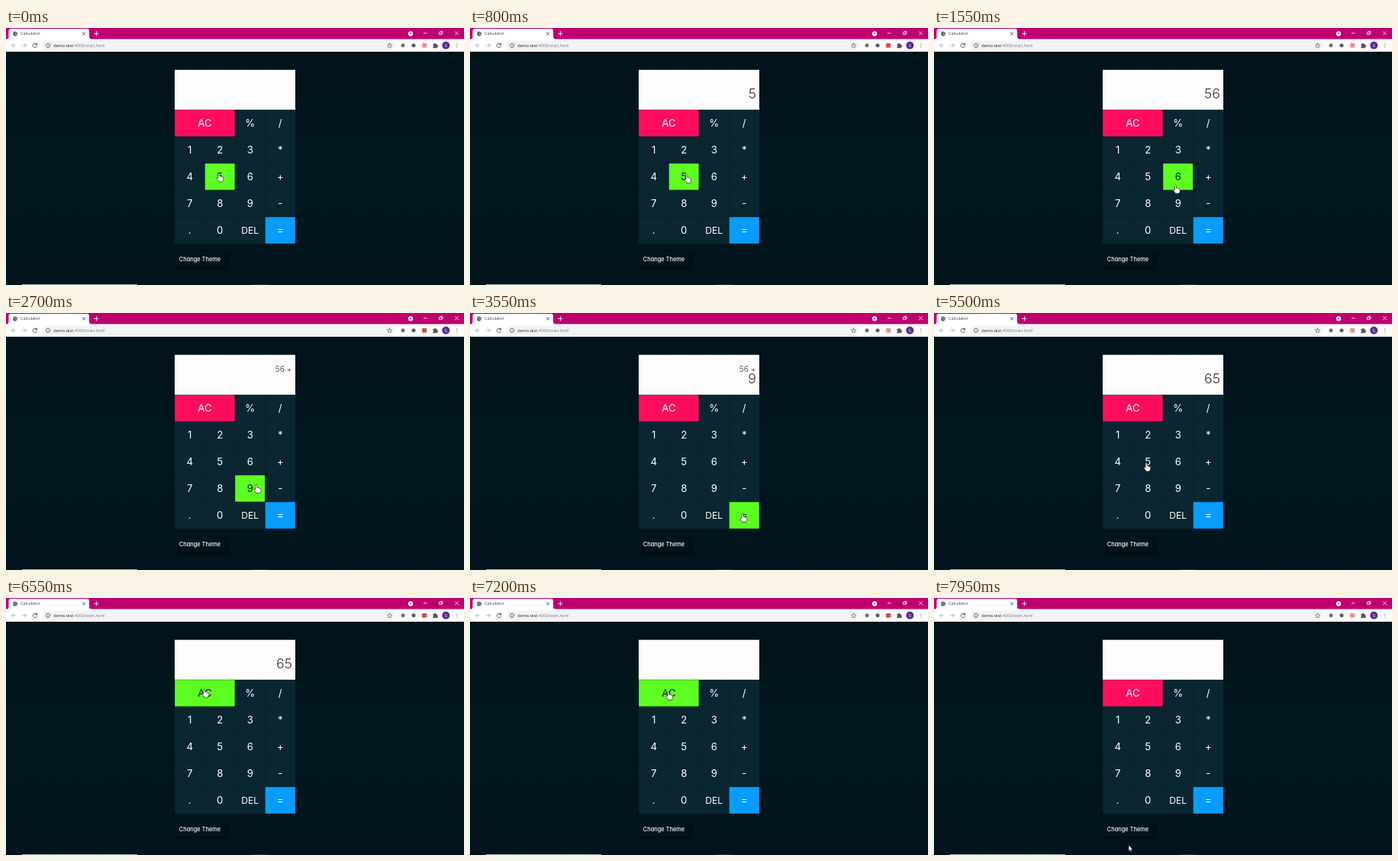
An HTML page that plays this animation: 600x336 px, repeating every 8 s.

```html
<!DOCTYPE html>
<html lang="en">
<head>
<meta charset="utf-8">
<title>Calculator</title>
<style>
html, body { margin: 0; width: 100%; height: 100%; overflow: hidden; background: #01161e; }
svg { display: block; width: 100vw; height: 100vh; }
text { font-family: Inter, sans-serif; font-feature-settings: "cv11"; }
.ui { font-family: "Open Sans", sans-serif; font-size: 5.5px; }
.line { fill: none; stroke-width: 1; stroke-linecap: round; stroke-linejoin: round; }
.theme { filter: drop-shadow(2px 2px 2.5px #000a); }
</style>
</head>
<body>
<svg id="stage" viewBox="0 0 600 336" preserveAspectRatio="none">
  <defs>
    <linearGradient id="page" x1="0" y1="0" x2="0" y2="1">
      <stop offset="0" stop-color="#01131b"/>
      <stop offset=".5" stop-color="#01171f"/>
      <stop offset="1" stop-color="#01141b"/>
    </linearGradient>
  </defs>
  <rect y="30" width="600" height="306" fill="url(#page)"/>

  <!-- title bar -->
  <rect width="600" height="15" fill="#bf006f"/>
  <path d="M0 15Q3.5 15 3.5 11V4Q3.5 1 6.5 1H106Q109 1 109 4V11Q109 15 113 15Z" fill="#fff"/>
  <circle cx="12" cy="7.5" r="2.9" fill="#50565b"/>
  <path class="line" d="M10 6.7q1.6 0 2 1.1t1.7 1M12.5 5.2l1.2.8" stroke="#fff" style="stroke-width:.7"/>
  <text class="ui" x="19" y="9.3" fill="#3c4043">Calculator</text>
  <path class="line" d="M100.3 5.7l3.4 3.4m0-3.4l-3.4 3.4" stroke="#44484b" style="stroke-width:.9"/>
  <path class="line" d="M116 7.3h5M118.5 4.8v5" stroke="#fff"/>
  <circle cx="530" cy="7.4" r="3.1" fill="#fff"/>
  <path d="M528.6 6.6h2.8L530 8.6Z" fill="#bf006f"/>
  <path class="line" d="M547.3 6.8h4M567.7 5.6h3v3h-3ZM569 5.4V4.3h3v3h-1M588.5 4.8l4 4m0-4l-4 4" stroke="#fff" style="stroke-width:.8"/>

  <!-- toolbar -->
  <rect y="14.5" width="600" height="16.5" fill="#fff"/>
  <g class="line">
    <path d="M12.5 22.8H7.5m2.3-2.4l-2.4 2.4 2.4 2.4M21.5 22.8h5m-2.3-2.4l2.4 2.4-2.4 2.4" stroke="#b3b6b9"/>
    <path d="M40 21.2A2.7 2.7 0 1 0 40.5 23.8M40.6 19.8v2.1h-2.1" stroke="#50555a"/>
  </g>
  <rect x="47" y="16.4" width="463" height="12.8" rx="6.4" fill="#f1f3f4"/>
  <circle class="line" cx="55" cy="22.8" r="2.8" stroke="#5f6368" style="stroke-width:.8"/>
  <path class="line" d="M55 22.6v1.7M55 21.2v.1" stroke="#5f6368" style="stroke-width:.8"/>
  <text class="ui" x="62.3" y="24.9" fill="#222528" textLength="">demo.test<tspan fill="#74787c">:4300/start.html</tspan></text>
  <path class="line" d="M502.5 19.9l.9 1.9 2.1.3-1.5 1.4.4 2.1-1.9-1-1.9 1 .4-2.1-1.5-1.4 2.1-.3Z" stroke="#55595d" style="stroke-width:.7"/>
  <circle cx="520" cy="22.8" r="2.5" fill="#6b7075"/>
  <circle cx="534" cy="22.8" r="2.5" fill="#53585d"/>
  <rect id="badge" x="545.2" y="19.9" width="5.8" height="5.8" fill="#e0473d"/>
  <path d="M559.3 21h1.7a1.2 1.2 0 0 1 2.4 0h1.5v1.7a1.2 1.2 0 0 1 0 2.4v1.1h-5.6v-1.5a1.2 1.2 0 0 0 0-2.2Z" fill="#565a5e"/>
  <circle cx="576.3" cy="22.7" r="5" fill="#5a2a9b"/>
  <text class="ui" x="576.3" y="24.6" fill="#fff" text-anchor="middle">S</text>
  <path class="line" d="M590.8 20.6v0M590.8 22.8v0M590.8 25v0" stroke="#55595d" style="stroke-width:1.2"/>

  <!-- calculator -->
  <rect x="221" y="54.7" width="158" height="52.6" fill="#fdfdfd"/>
  <text id="small" x="374.5" y="77.3" font-size="10.3" font-weight="300" fill="#303638" text-anchor="end"></text>
  <text id="big" x="375" y="91.8" font-size="17.7" font-weight="300" fill="#303638" text-anchor="end"></text>
  <g id="keys"></g>
  <rect class="theme" x="221" y="293" width="66" height="19" fill="#01141b"/>
  <text x="254" y="305.3" font-size="7.4" font-weight="500" fill="#fff" text-anchor="middle">Change Theme</text>

  <!-- taskbar edge -->
  <rect x="21" y="335" width="151" height="1" fill="#9bbcc4"/>
  <rect x="322" y="335" width="22" height="1" fill="#26383f"/>

  <path id="arrow" d="M0 0V8L1.8 6.3 3 9 4.3 8.4 3.1 5.8H5.6Z" fill="#fff" stroke="#111" stroke-width=".6"/>
  <path id="hand" d="M-1 .9Q-1-.2 0-.2T1 .9V4Q1.2 3.4 2 3.6T2.8 4.4Q3.4 3.8 4.1 4.4L4.4 5.1Q5.8 4.7 5.8 6.1V7.6Q5.7 8.9 4.7 9.9V11H-.4V10Q-1.5 8.6-2.8 6.9-3.4 5.5-2.3 5.5-1.7 5.5-1 6.4Z" fill="#fff" stroke="#111" stroke-width=".6"/>
</svg>
<script>
const LOOP = 8000;
const HOVER_LAG = 120;
const LEFT = 221, TOP = 107, COL = 39.5, ROW = 35;
const GREEN = "#5cff20";
const $ = id => document.getElementById(id);

// time, x, y of the pointer tip
const route = [
  [0, 279, 190], [700, 279, 190], [1150, 317, 203], [1550, 316.5, 205.5],
  [1650, 316.5, 205.5], [2000, 360, 192], [2350, 360, 192],
  [2650, 327.5, 224], [2700, 328, 224.5], [3200, 328, 224.5],
  [3650, 361, 268], [4300, 362, 269], [5200, 362, 269],
  [5500, 278, 196], [5900, 261, 121], [6550, 260, 119],
  [7150, 260, 119], [7800, 256, 318], [7950, 255, 323], [LOOP, 255, 323]
];

// time, upper line, lower line of the display
const entries = [
  [0, "", ""], [450, "", "5"], [1350, "", "56"], [2150, "56 +", ""],
  [2950, "56 +", "9"], [3850, "", "65"], [6800, "", ""]
];

function add(parent, tag, attrs, text = "") {
  const el = document.createElementNS(parent.namespaceURI, tag);
  for (const name in attrs) el.setAttribute(name, attrs[name]);
  el.textContent = text;
  return parent.appendChild(el);
}

function makeKey(label, col, row, span = 1, fill = "#0a2630") {
  const x = LEFT + col * COL, y = TOP + row * ROW, w = span * COL;
  const rect = add($("keys"), "rect", {
    x, y, width: w, height: ROW, fill, stroke: "#08212b", "stroke-width": .4
  });
  const text = add($("keys"), "text", {
    x: x + w / 2, y: y + 22.3, fill: "#fff", "text-anchor": "middle",
    "font-size": label === "DEL" ? 12.2 : 13.2
  }, label);
  return { x, y, w, fill, rect, text };
}

const keys = [
  makeKey("AC", 0, 0, 2, "#ff0e5e"), makeKey("%", 2, 0), makeKey("/", 3, 0)
];
["123*", "456+", "789-"].forEach((line, row) =>
  [...line].forEach((label, col) => keys.push(makeKey(label, col, row + 1))));
keys.push(makeKey(".", 0, 4), makeKey("0", 1, 4), makeKey("DEL", 2, 4),
  makeKey("=", 3, 4, 1, "#089dff"));

function pointerAt(t) {
  const i = Math.max(1, route.findIndex(p => p[0] > t));
  const [t0, x0, y0] = route[i - 1], [t1, x1, y1] = route[i];
  const u = Math.max(0, (t - t0) / (t1 - t0));
  const s = u * u * (3 - 2 * u);
  return [x0 + (x1 - x0) * s, y0 + (y1 - y0) * s];
}

const keyAt = ([x, y]) => keys.find(k =>
  x >= k.x && x < k.x + k.w && y >= k.y && y < k.y + ROW);

function draw(t) {
  const tip = pointerAt(t);
  const over = keyAt(tip);
  const lit = over === keyAt(pointerAt(Math.max(0, t - HOVER_LAG))) ? over : null;
  for (const k of keys) {
    k.rect.setAttribute("fill", k === lit ? GREEN : k.fill);
    k.text.setAttribute("fill", k === lit ? "#10220d" : "#fff");
  }
  const [, upper, lower] = entries.filter(e => e[0] <= t).pop();
  $("small").textContent = upper;
  $("big").textContent = lower;

  for (const id of ["arrow", "hand"]) {
    $(id).setAttribute("transform", `translate(${tip})`);
    $(id).setAttribute("visibility", (id === "hand") === !!over ? "visible" : "hidden");
  }
  const blink = t % 2000;
  $("badge").setAttribute("opacity", blink >= 400 && blink < 1400 ? 1 : .6);
}

const start = performance.now();
function tick() {
  draw((performance.now() - start) % LOOP);
  requestAnimationFrame(tick);
}
tick();
</script>
</body>
</html>
```
